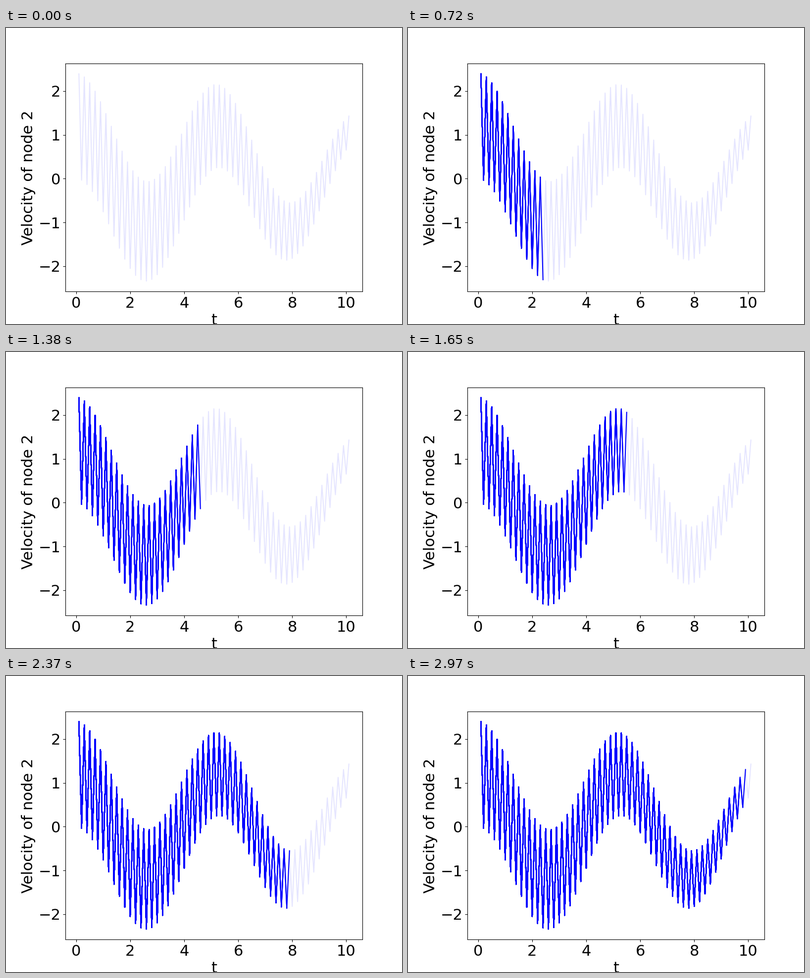
A matplotlib script that plays this animation: 800x600 px, repeating every 3000 ms.

```python
import numpy as np
import matplotlib.pyplot as plt
from matplotlib.animation import FuncAnimation

DT = 0.1
STEPS = 101
FRAMES = 100
OMEGA = 1.2          # driving frequency of the base node
K1, K2 = 1e7, 1.0    # stiff and soft spring


def node_velocity():
    """Velocity of the stiffly held node, by the trapezoidal rule."""
    stiff = np.array([[K1 + K2, -K2], [-K2, K2]])
    eff = stiff + 4 / DT**2 * np.eye(2)
    u, v, a = np.zeros((3, 2))
    times = DT * np.arange(1, STEPS + 1)
    speeds = []
    for t in times:
        force = np.array([K1 * np.sin(OMEGA * t), 0])
        new = np.linalg.solve(eff, force + 4 / DT**2 * u + 4 / DT * v + a)
        a = 4 / DT**2 * (new - u) - 4 / DT * v - a
        v = 2 / DT * (new - u) - v
        u = new
        speeds.append(v[0])
    return times, np.array(speeds)


plt.rcParams.update({"font.family": "DejaVu Sans", "font.size": 22})

fig, ax = plt.subplots(figsize=(8, 6), dpi=100)
fig.subplots_adjust(left=0.15, right=0.9, bottom=0.11, top=0.88)

t, vel = node_velocity()
ax.plot(t, vel, color="blue", alpha=0.1)
ax.set_xticks(range(0, 11, 2))
ax.set_yticks(range(-2, 3))
ax.set_xlabel("t")
ax.set_ylabel("Velocity of node 2")

# Each step lays a longer trace over the earlier ones, so old strokes grow bolder.
traces = [ax.plot(t[:n], vel[:n], color="blue", visible=False)[0]
          for n in range(FRAMES)]


def update(i):
    for n, trace in enumerate(traces):
        trace.set_visible(1 < n <= i)
    return traces


anim = FuncAnimation(fig, update, frames=FRAMES, interval=30,
                     repeat=True, repeat_delay=0, blit=False)
plt.show()
```
